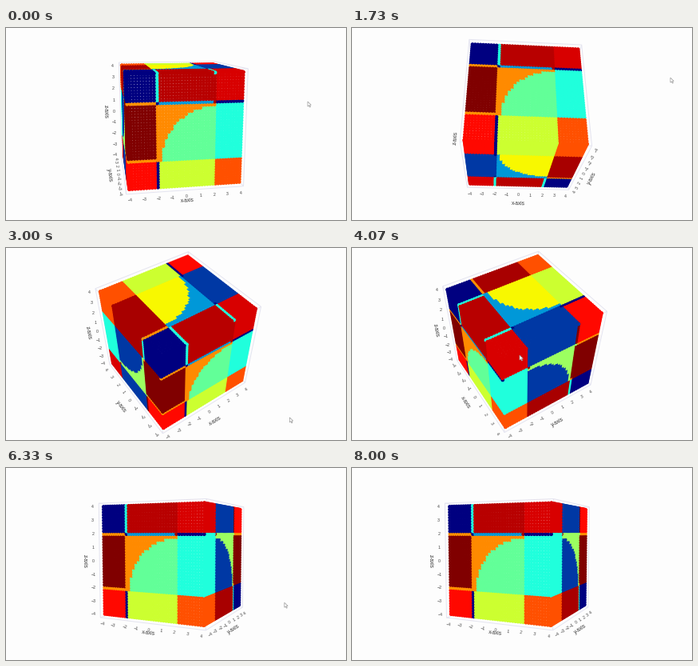
A matplotlib script for the animation above (8.07 s loop, 426 by 240 pixels).

```python
import numpy as np
import matplotlib.pyplot as plt
from matplotlib.animation import FuncAnimation
from matplotlib.collections import LineCollection
from itertools import product

W, H, LOOP, FRAMES = 426, 240, 8070, 121
STEP = LOOP / FRAMES
FOCAL, DIST, CX, CY = 473, 3.64, 213, 114
HALF, BOX, N = 0.485, 0.515, 20

NAVY, BLUE, SKY, CYAN = "#000080", "#0038a4", "#0098d8", "#20ffdc"
LIME, ORANGE, MAROON = "#ccff30", "#ff9000", "#800000"

# Each digit is a zone along x, y, z: 0 low, 1 at -2, 2 middle, 3 at +2, 4 high.
# Everything is symmetric under inversion, so half the zones are enough.
CELLS = {"004": NAVY, "404": "#d80000", "000": "#ff0800", "400": "#ff5000",
         "204": "#b80000", "024": "#a80000", "244": LIME, "424": BLUE,
         "002": MAROON, "402": CYAN}
SEAMS = {"y003": ORANGE, "y104": CYAN, "y203": SKY, "y403": NAVY,
         "y100": NAVY, "y001": ORANGE, "y103": NAVY, "y303": "#a00000",
         "x403": CYAN, "x443": ORANGE, "x434": MAROON, "x414": BLUE,
         "x432": MAROON, "x430": CYAN, "x431": ORANGE, "x413": "#a00000",
         "z014": ORANGE, "z104": CYAN, "z304": CYAN,
         "z344": NAVY, "z324": BLUE, "z314": NAVY, "z334": NAVY}
# Quarter discs: centre, colour inside, colour outside
DISCS = {"x": ((0, -10, -10), BLUE, "#9cff60"),
         "y": ((10, 0, -10), "#62ff98", "#ff8a00"),
         "z": ((-10, 10, 0), "#f8f800", SKY)}
RADIUS = 18.5


def zone(g):
    return 2 + np.sign(g) * (abs(g) > 10) + np.sign(g) * (abs(g) >= 10)


def code(digits):
    return "".join(str(int(d)) for d in digits)


def colour(axis, p):
    z = np.array([zone(g) for g in p])
    for c in (z, 4 - z):
        if axis + code(c) in SEAMS:
            return SEAMS[axis + code(c)]
    z[z % 2 == 1] = 2
    for c in (z, 4 - z):
        if code(c) in CELLS:
            return CELLS[code(c)]
    i = "xyz".index(axis)
    mid, inner, outer = DISCS[axis]
    front = -1 if axis == "y" else 1
    q = p * front * np.sign(p[i])
    d = np.delete(q - np.array(mid), i)
    return inner if np.hypot(*d) < RADIUS else outer


def make_face(i, side):
    grid = np.array(list(product(range(-N, N + 1), repeat=2)))
    pts = np.insert(grid, i, side * N, axis=1)
    cols = [colour("xyz"[i], p) for p in pts]
    rgb = [[int(c[k:k + 2], 16) / 255 for k in (1, 3, 5)] + [1] for c in cols]
    return pts * HALF / N, np.array(rgb)


FACES = {(i, s): make_face(i, s) for i in range(3) for s in (-1, 1)}

# Time, azimuth, elevation, pointer x, pointer y
KEYS = np.array([[0, -100, 12, 378, 92],
                 [1730, -94, -30, 399, 62],
                 [3000, -125.5, 46, 355, 213],
                 [4070, -32, 47, 210, 134],
                 [5330, 4.3, 2.3, 240, 98],
                 [6330, -64.6, 4, 350, 169],
                 [8070, -64.6, 4, 350, 169]])


def pose(t):
    i = min(np.searchsorted(KEYS[:, 0], t, side="right") - 1, len(KEYS) - 2)
    a, b = KEYS[i], KEYS[i + 1]
    u = (t - a[0]) / (b[0] - a[0])
    return (a + (b - a) * u * u * (3 - 2 * u))[1:]


def project(p, az, el):
    p = np.asarray(p, float)
    along = p[:, 0] * np.cos(az) + p[:, 1] * np.sin(az)
    lat = p[:, 1] * np.cos(az) - p[:, 0] * np.sin(az)
    up = p[:, 2] * np.cos(el) - along * np.sin(el)
    depth = DIST - along * np.cos(el) - p[:, 2] * np.sin(el)
    k = FOCAL / depth
    return np.column_stack([CX + lat * k, CY - up * k]), depth


fig = plt.figure(figsize=(W / 100, H / 100), dpi=100, facecolor="#fdfdfd")
ax = fig.add_axes([0, 0, 1, 1])
ax.set(xlim=(0, W), ylim=(H, 0))
ax.axis("off")

CORNERS = np.array(list(product((-BOX, BOX), repeat=3)))
EDGES = [(a, b) for a in range(8) for b in range(a + 1, 8)
         if np.sum(CORNERS[a] != CORNERS[b]) == 1]
box = ax.add_collection(LineCollection([], colors="#e4e4f0", linewidths=0.7, zorder=1))
dots = ax.scatter([], [], s=12, linewidths=0, zorder=2)

FONT = dict(family="Liberation Sans", ha="center", va="center",
            rotation_mode="anchor", zorder=3)
TICKS = np.arange(-4, 5)
ticks = [[ax.text(0, 0, str(v).replace("-", "\u2212"), size=3.8, color="#444444", **FONT)
          for v in TICKS] for _ in range(3)]
titles = [ax.text(0, 0, n + "-axis", size=4.7, color="#333333", **FONT) for n in "xyz"]

ARROW = np.array([[0, 0], [0, 6], [1.5, 4.8], [2.6, 7], [3.5, 6.5], [2.5, 4.4], [4.3, 4.2]])
pointer = ax.fill(*ARROW.T, fc="white", ec="#999999", lw=0.5, zorder=4)[0]


def place_axis(i, fixed, az, el):
    """Lay ticks and title outside the box edge that runs along axis i."""
    line = np.tile(np.array(fixed, float), (len(TICKS), 1))
    line[:, i] = TICKS * HALF / 4
    xy, _ = project(line, az, el)
    d = xy[-1] - xy[0]
    size = max(np.hypot(*d), 1e-6)
    out = np.array([-d[1], d[0]]) / size
    if out @ (xy[4] - (CX, CY)) < 0:
        out = -out
    angle = (np.degrees(np.arctan2(-d[1], d[0])) + 90) % 180 - 90
    # Titles move out as the view tilts or the edge foreshortens
    tilt = abs(np.degrees(el)) / 35
    gap = 19 if i == 2 else 10 + 11 * np.clip(max(tilt, 1 - size / 150), 0, 1)
    below = i == 2 and el < np.radians(-15)
    for txt, p in zip(ticks[i], xy):
        txt.set_position(p + out * 8)
        txt.set_rotation(0 if i == 2 else angle)
        txt.set_visible(not below)
    titles[i].set_position(xy[0] + out * 6 if below else xy[4] + out * gap)
    titles[i].set_rotation(angle)


def draw(k):
    t = k * STEP
    a, e, mx, my = pose(t)
    az, el = np.radians([a, e])
    eye = DIST * np.array([np.cos(el) * np.cos(az), np.cos(el) * np.sin(az), np.sin(el)])

    seen = [f for (i, s), f in FACES.items() if eye[i] * s > HALF]
    xy, depth = project(np.concatenate([f[0] for f in seen]), az, el)
    order = np.argsort(-depth, kind="stable")
    dots.set_offsets(xy[order])
    dots.set_facecolors(np.concatenate([f[1] for f in seen])[order])

    c, _ = project(CORNERS, az, el)
    box.set_segments([c[[p, q]] for p, q in EDGES])

    flip = 1 if el > 0 else -1
    sx, sy = (BOX * flip * (1 if v > 0 else -1) for v in eye[:2])
    place_axis(0, (0, sy, -BOX), az, el)
    place_axis(1, (sx, 0, -BOX), az, el)
    posts = list(product((-BOX, BOX), repeat=2))
    ends, _ = project([(x, y, 0) for x, y in posts], az, el)
    place_axis(2, (*posts[np.argmin(ends[:, 0])], 0), az, el)

    pointer.set_xy(ARROW + (mx, my))
    pointer.set_visible(t < 7000)
    return dots, box, pointer


anim = FuncAnimation(fig, draw, frames=FRAMES, interval=STEP, repeat=True,
                     repeat_delay=0, blit=False)
plt.show()
```
